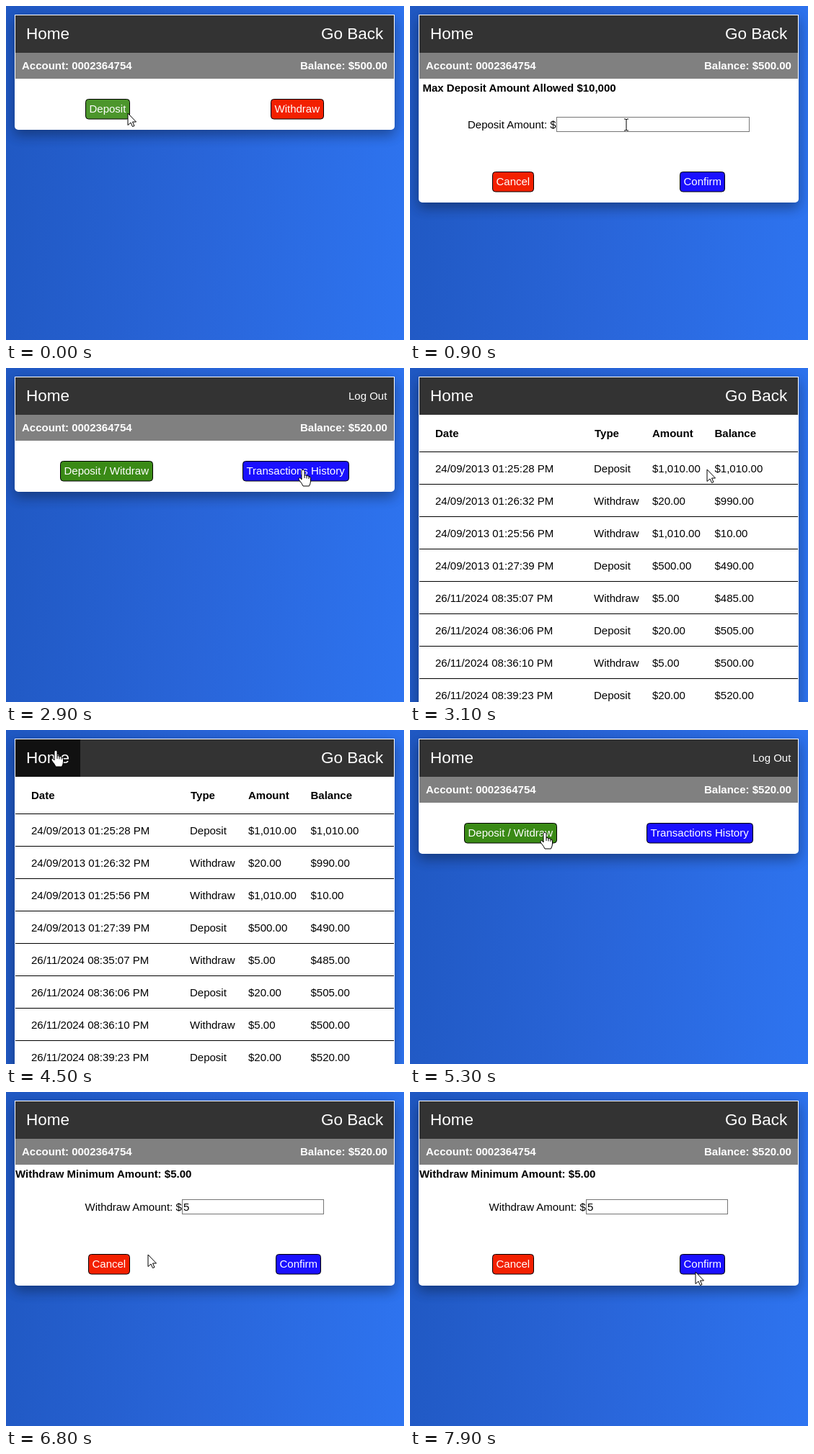
These frames come from a looping animation (552x464 px, 8 s). An HTML page:

```html
<!DOCTYPE html>
<html lang="en">
<head>
<meta charset="utf-8">
<title>Account demo</title>
<style>
  html, body { margin: 0; width: 100%; height: 100%; overflow: hidden; }
  body { position: relative; background: linear-gradient(95deg, #2058c2, #2965d9 50%, #2e74f0); }
  #card {
    position: absolute; left: 12px; top: 12px; width: 527px;
    background: #fff; border-radius: 0 0 5px 5px;
    box-shadow: 0 8px 16px rgba(0, 0, 0, .2), 0 6px 20px rgba(0, 0, 0, .19);
  }
  svg { position: absolute; left: 0; top: 0; }
  text { font: 15px "Liberation Sans", Arial, sans-serif; white-space: pre; }
  .b { font-weight: bold; }
  .nav { font-size: 22.5px; }
</style>
</head>
<body>
<div id="card"></div>
<svg width="552" height="464" viewBox="0 0 552 464">
  <g id="page"></g>
  <g id="cursor" fill="#fff" stroke="#000" stroke-linejoin="round"></g>
</svg>
<script>
const $ = id => document.getElementById(id);
const GREEN = '#3a8a16', RED = '#f32000', BLUE = '#1a10ff';

const text = (x, y, s, fill = '#000', cls = '') =>
  `<text x="${x}" y="${y}" fill="${fill}" class="${cls}">${s}</text>`;
const rect = (x, y, w, h, fill, more = '') =>
  `<rect x="${x}" y="${y}" width="${w}" height="${h}" fill="${fill}" ${more}/>`;
const button = (x, y, w, s, fill) =>
  rect(x + .5, y + .5, w - 1, 27.5, fill, 'rx="4" stroke="#000"') +
  text(x + 5.5, y + 19, s, '#fff');

const header = (hover, right) =>
  rect(13, 13, 525, 52, '#333') + (hover ? rect(13, 13, 90, 52, '#111') : '') +
  text(28, 46, 'Home', '#fff', 'nav') + right;
const goBack = text(437, 46, 'Go Back', '#fff', 'nav');
const logOut = text(475, 44, 'Log Out', '#fff');

const account = balance => rect(13, 65, 525, 36, '#808080') +
  text(22, 88, 'Account: 0002364754', '#fff', 'b') +
  text(408, 88, `Balance: $${balance}.00`, '#fff', 'b');

const choose = button(110, 129, 62, 'Deposit', '#4c962c') + button(367, 129, 74, 'Withdraw', RED);
const home = button(75, 129, 129, 'Deposit / Witdraw', GREEN) +
  button(328, 129, 148, 'Transactions History', BLUE);

const form = (titleX, title, x, y, label, inputX, inputW, value) =>
  text(titleX, 119, title, '#000', 'b') + text(x, y + 16, label) +
  rect(inputX + .5, y + .5, inputW - 1, 20, '#fff', 'stroke="#767676"') +
  text(inputX + 2, y + 16, value) +
  button(114, y + 76, 58, 'Cancel', RED) + button(374, y + 76, 63, 'Confirm', BLUE);
const deposit = value => form(17.5, 'Max Deposit Amount Allowed $10,000',
  80, 154, 'Deposit Amount: $', 203, 268, value);
const withdraw = value => form(13, 'Withdraw Minimum Amount: $5.00',
  109.5, 149, 'Withdraw Amount: $', 244, 197, value);

const columns = [35, 255, 336, 422.5];
const history = [
  '24/09/2013 01:25:28 PM|Deposit|$1,010.00|$1,010.00',
  '24/09/2013 01:26:32 PM|Withdraw|$20.00|$990.00',
  '24/09/2013 01:25:56 PM|Withdraw|$1,010.00|$10.00',
  '24/09/2013 01:27:39 PM|Deposit|$500.00|$490.00',
  '26/11/2024 08:35:07 PM|Withdraw|$5.00|$485.00',
  '26/11/2024 08:36:06 PM|Deposit|$20.00|$505.00',
  '26/11/2024 08:36:10 PM|Withdraw|$5.00|$500.00',
  '26/11/2024 08:39:23 PM|Deposit|$20.00|$520.00'
].map((row, i) => rect(13, 116 + 45 * i, 525, 1, '#000') +
  row.split('|').map((s, c) => text(columns[c], 145 + 45 * i, s)).join('')).join('') +
  ['Date', 'Type', 'Amount', 'Balance'].map((s, c) =>
    text(columns[c] + (c === 1 ? 1 : 0), 96, s, '#000', 'b')).join('');

// start time, kind, card bottom, right-hand link, content
const screens = [
  [0, 'choose', 172, goBack, account(500) + choose],
  [400, 'deposit', 273, goBack, account(500) + deposit('')],
  [1400, 'deposit', 273, goBack, account(500) + deposit('2')],
  [1600, 'deposit', 273, goBack, account(500) + deposit('20')],
  [2500, 'home', 172, logOut, account(520) + home],
  [3000, 'history', 700, goBack, history],
  [4600, 'home', 172, logOut, account(520) + home],
  [5400, 'choose', 172, goBack, account(520) + choose],
  [6000, 'withdraw', 269, goBack, account(520) + withdraw('')],
  [6600, 'withdraw', 269, goBack, account(520) + withdraw('5')]
];

// pointer path: time, x, y
const path = [
  [0, 169, 149], [400, 169, 149], [900, 300, 165], [1700, 300, 165],
  [2200, 422, 245], [2500, 422, 245], [2800, 412, 141], [3600, 412, 141],
  [4400, 69, 28], [4700, 69, 28], [5200, 187, 142], [5400, 187, 142],
  [5800, 400, 145], [6000, 400, 145], [6300, 300, 160], [6500, 300, 160],
  [6800, 197, 226], [7300, 197, 226], [7900, 396, 250], [8000, 396, 250]
];

const shapes = {
  arrow: '<path d="M0 0V16.5L4 13 6.5 18.5 9 17.5 6.5 12H11.5Z"/>',
  hand: '<path d="M-2 1.5Q0-1.5 2 1.5V8Q4.5 6.5 5 9 7.5 7.5 8 10 10.5 9.5 10.5 12V16Q10.5 19 8.5 23H0Q-1 20-6 14-6 10.5-3.5 12L-2 14Z"/>' +
    '<path d="M2 8V12M5 9V12.5M8 10V13"/>',
  beam: '<path fill="none" d="M-3-8H-1L0-7 1-8H3M0-7V7M-3 8H-1L0 7 1 8H3"/>'
};

const inside = (p, x, y, w, h) => p[0] >= x && p[0] < x + w && p[1] >= y && p[1] < y + h;

function pointer(t) {
  const i = path.findIndex(k => k[0] > t);
  const [t0, x0, y0] = path[i - 1], [t1, x1, y1] = path[i];
  const u = (t - t0) / (t1 - t0), e = u * u * (3 - 2 * u);
  return [Math.round(x0 + (x1 - x0) * e), Math.round(y0 + (y1 - y0) * e)];
}

function draw(now) {
  const t = Math.floor(now % 8000 / 100) * 100;
  const [, kind, bottom, right, content] = screens.filter(s => s[0] <= t).pop();
  const p = pointer(t);
  const onHome = inside(p, 13, 13, 90, 52);
  const onLink = onHome || kind === 'home' &&
    (inside(p, 75, 129, 129, 28) || inside(p, 328, 129, 148, 28));
  const onInput = kind === 'deposit' && inside(p, 203, 154, 268, 21) ||
    kind === 'withdraw' && inside(p, 244, 149, 197, 21);

  $('card').style.height = bottom - 12 + 'px';
  $('page').innerHTML = header(onHome, right) + content;
  $('cursor').innerHTML = shapes[onLink ? 'hand' : onInput ? 'beam' : 'arrow'];
  $('cursor').setAttribute('transform', `translate(${p})`);
}

const start = performance.now();
function loop() {
  draw(performance.now() - start);
  requestAnimationFrame(loop);
}
loop();
</script>
</body>
</html>
```
